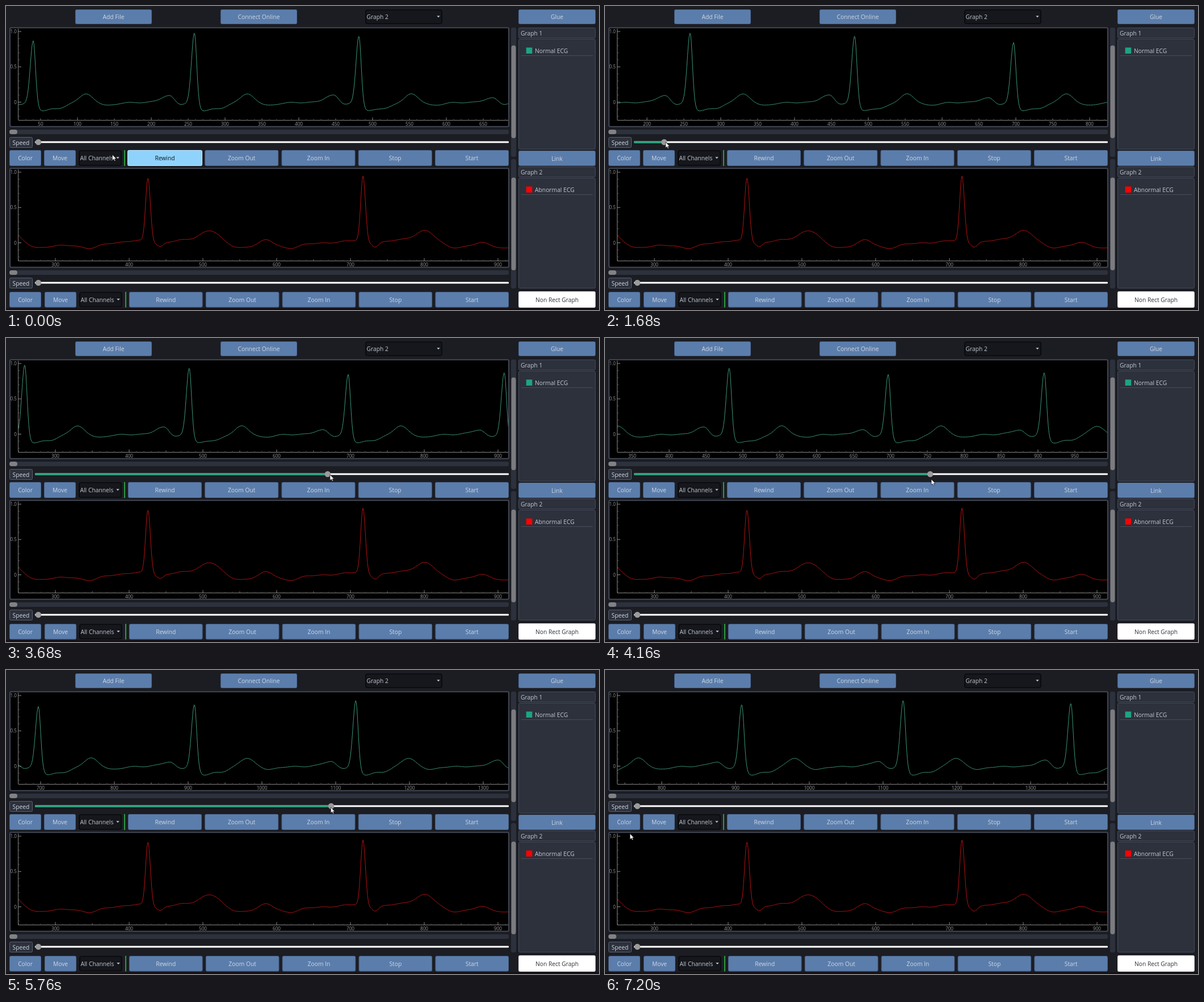
An HTML page for the animation above (7280 ms loop, 1045 by 536 pixels).

```html
<!DOCTYPE html>
<html lang="en">
<head>
<meta charset="utf-8">
<title>ECG viewer</title>
<style>
  html, body { margin: 0; width: 100%; height: 100%; overflow: hidden; background: #1b1d23; }
  svg { display: block; width: 1045px; height: 536px; font: 10.3px "Open Sans", "Noto Sans", sans-serif; fill: #c3c8d1; }
  .tick { font-size: 8.2px; fill: #999; }
</style>
</head>
<body>
<svg id="stage" viewBox="0 0 1045 536" xmlns="http://www.w3.org/2000/svg"></svg>
<script>
const LOOP = 7280;
const LEFT = 22, RIGHT = 886, UNIT = 1.3, SPAN = 665, VOLT = 124.5;
const PANEL = '#2c313c', EDGE = '#464c5a', BLUE = '#5b7dab', GREEN = '#1fa67c';

// ---- drawing helpers ----
const rect = (x, y, w, h, fill, extra = '') =>
  `<rect x="${x}" y="${y}" width="${w}" height="${h}" fill="${fill}" ${extra}/>`;
const box = (x1, y1, x2, y2, fill, edge) =>
  rect(x1 + .5, y1 + .5, x2 - x1 - 1, y2 - y1 - 1, fill, `stroke="${edge}" rx="2"`);
const text = (x, y, s, extra = '') => `<text x="${x}" y="${y + 3.8}" ${extra}>${s}</text>`;
const MID = 'text-anchor="middle"';
const line = (x1, y1, x2, y2, color, w = 1) =>
  `<line x1="${x1}" y1="${y1}" x2="${x2}" y2="${y2}" stroke="${color}" stroke-width="${w}"/>`;

const button = (x1, y1, x2, y2, label, fill = BLUE, edge = '#4b638a', ink = '#d0d7e2') =>
  box(x1, y1, x2, y2, fill, edge) + text((x1 + x2) / 2, (y1 + y2) / 2 + .5, label, `${MID} fill="${ink}"`);

const combo = (x1, y1, x2, y2, label) => {
  const y = (y1 + y2) / 2, a = x2 - 7;
  return rect(x1 + 1, y1 + 1, x2 - x1 - 2, y2 - y1 - 2, '#15171c', 'stroke="#08090c" stroke-width="1.6" rx="3"')
    + text(x1 + 2.5, y + .5, label)
    + `<path d="M${a - 2.7} ${y - 1.7}h5.4l-2.7 3z"/>`;
};

const slider = (y, handle, active) =>
  rect(51, y - 1.5, RIGHT - 51, 3, '#fff', 'rx="1"')
  + (active ? rect(51, y - 1.5, handle - 51, 3, GREEN, 'rx="1"') : '')
  + `<circle cx="${handle}" cy="${y}" r="5.2" fill="#9b9b9b"/>`;

// ---- signals: each beat is a sum of skewed bells, heights in pixels ----
const bump = (d, height, rise, fall) => height * Math.exp(-((d / (d < 0 ? rise : fall)) ** 2) / 2);

const normalBeat = (d, spike, early) =>
  bump(d + 34, early, 12, 6) + bump(d + 19, -3, 5, 8)
  + bump(d, spike, 3.9, 3)
  + bump(d - 12, -13, 5, 10) + bump(d - 36, -9, 12, 10)
  + bump(d - 71, 15, 9, 9) + bump(d - 102, -5, 9, 10);

const abnormalBeat = (d, spike, late) =>
  bump(d + 12, 5, 16, 8)
  + bump(d, spike, 3.1, 3.3) + bump(d - 17, -7, 4, 4)
  + bump(d - 50, 6, 16, 20) + bump(d - 85, 21, 13, 12.5)
  + bump(d - 125, -8, 13, 18) + bump(d - 161, late, 9, 8) + bump(d - 192, -9, 14, 12);

// Beats are [time, spike height, height of the small wave].
const NORMAL = [[40, 110, 0], [258.5, 124, 12], [481.5, 119, 13], [697, 107, 8],
  [908.5, 110, 8], [1127.3, 117, 9], [1354.6, 113, 11]];
const ABNORMAL = [[153, 0, -2], [425.5, 114, 8], [717, 116, 3]];

function trace(shape, beats, from, to) {
  const out = [];
  for (let x = from; x <= to; x++) {
    const y = beats.reduce((sum, [at, ...size]) => sum + shape(x - at, ...size), .6 * Math.sin(x * .23) - .8);
    out.push(`${(x * UNIT).toFixed(1)},${(-y).toFixed(1)}`);
  }
  return out.join(' ');
}

// ---- axes ----
const TICKS = ['#8c8c8c', '#707070', '#444'];

function timeAxis(start, y) {
  const halves = [];
  for (let v = Math.ceil(start / 50) * 50; v <= start + SPAN; v += 50) halves.push(v);
  const step = halves.join('').length <= 40 ? 50 : 100;
  let out = '';
  for (let v = Math.ceil(start / 10) * 10; v <= start + SPAN; v += 10) {
    const x = LEFT + (v - start) * UNIT;
    const level = v % 100 === 0 ? 0 : v % 50 === 0 ? 1 : 2;
    out += line(x, y, x, y - 5 / (1 + level / 2), TICKS[level]);
    if (v % step === 0 && x < RIGHT - 10) out += text(x, y + 5.2, v, `class="tick" ${MID}`);
  }
  return out;
}

function voltAxis(zero) {
  let out = '';
  for (let i = -2; i <= 10; i++) {
    const y = zero - i * VOLT / 10, major = i % 5 === 0;
    out += line(LEFT, y, LEFT + (major ? 5 : 2.5), y, TICKS[major ? 0 : 2]);
    if (major) out += text(19, y - .6, i ? (i / 10).toFixed(1) : '0', 'class="tick" text-anchor="end"');
  }
  return out;
}

// ---- layout ----
function plot(id, top, points, color) {
  const zero = top + 131.5, axis = top + 163.5;
  return rect(7, top + .3, 879, 174.3, '#000', `stroke="${EDGE}" stroke-width="1.8" rx="2"`)
    + line(LEFT - .5, top + 2, LEFT - .5, axis, '#858585') + line(LEFT, axis, RIGHT - 1, axis, '#858585')
    + voltAxis(zero)
    + `<g id="${id}Axis"></g>`
    + `<clipPath id="${id}Clip">${rect(LEFT, top + 2, RIGHT - LEFT - 1, 162)}</clipPath>`
    + `<g clip-path="url(#${id}Clip)"><polyline id="${id}Trace" points="${points}"
        fill="none" stroke="${color}" stroke-linejoin="round"/></g>`
    + rect(6, top + 180, 880, 8, PANEL, 'rx="3"') + rect(6, top + 180, 14, 8, '#818286', 'rx="4"')
    + button(6, top + 193, 47, top + 212, 'Speed', PANEL, '#596072');
}

// Controls under a plot; the wide buttons share the room right of the bar.
function controls(y1, y2, shift) {
  const first = 215 + 2 * shift, gap = 5.3, w = (RIGHT - first - 4 * gap) / 5;
  return button(6, y1, 62, y2, 'Color') + button(67 + shift, y1, 123 + shift, y2, 'Move')
    + combo(128 + shift, y1, 204 + shift, y2, 'All Channels')
    + line(209 + 2 * shift, y1, 209 + 2 * shift, y2, '#2c9c3c', 2)
    + ['Rewind', 'Zoom Out', 'Zoom In', 'Stop', 'Start'].map((label, i) => {
      const x = first + i * (w + gap);
      return button(x, y1, x + w, y2, label);
    }).join('');
}

function legend(top, bottom, title, name, color) {
  return box(903, top, 1039, top + 19, PANEL, EDGE) + text(907, top + 10, title)
    + box(903, top + 20, 1039, bottom, PANEL, EDGE)
    + rect(916.7, top + 35.3, 10.6, 10.6, color) + text(932, top + 41, name)
    + line(908, top + 49.5, 1034, top + 49.5, '#474d5a');
}

const scrollbar = (y, handle) =>
  rect(890, y, 9, 228, PANEL, 'rx="3"') + rect(890.5, handle, 8, 163.5, '#7b7c80', 'rx="4"');

document.getElementById('stage').innerHTML =
  rect(0, 0, 1045, 536, '#1b1d23') + rect(0, 533, 1045, 3, '#160f14')
  + button(122, 6, 257, 32, 'Add File') + button(378, 6, 513, 32, 'Connect Online')
  + combo(633, 6, 769, 32, 'Graph 2')
  + button(903, 6, 1039, 32, 'Glue')
  + plot('top', 38, trace(normalBeat, NORMAL, 20, 1420), '#3b957b')
  + controls(254, 282, 0)
  + `<g id="hover">${button(214, 254, 346, 282, 'Rewind', '#8fd3fc', '#c4e8ff', '#10141a')}</g>`
  + plot('low', 286, trace(abnormalBeat, ABNORMAL, 250, 916), '#b41212')
  + slider(488, 57, false)
  + controls(504, 531.5, 1)
  + scrollbar(38, 69.5) + scrollbar(270, 302.5)
  + legend(38, 253, 'Graph 1', 'Normal ECG', '#1fa384')
  + button(903, 255, 1039, 282, 'Link')
  + legend(283, 498, 'Graph 2', 'Abnormal ECG', '#f00')
  + button(903, 503, 1039, 532, 'Non Rect Graph', '#fff', '#d5d7dc', '#2c3038')
  + '<g id="speed"></g>'
  + '<path id="cursor" d="M0 0V10.2L2.4 8L4 11.4L5.6 10.7L4.1 7.4H7.2Z" fill="#fff" stroke="#111" stroke-width=".7"/>';

const el = id => document.getElementById(id);
const place = (id, x, y) => el(id).setAttribute('transform', `translate(${x} ${y})`);
el('lowAxis').innerHTML = timeAxis(250, 449.5);
place('lowTrace', LEFT - 250 * UNIT, 417.5);

// ---- motion ----
// Linear track through [time, ...values] keys.
function at(keys, t) {
  let i = 0;
  while (i < keys.length - 2 && keys[i + 1][0] <= t) i++;
  const [t0, ...a] = keys[i], [t1, ...b] = keys[i + 1];
  const u = Math.max(0, Math.min(1, (t - t0) / (t1 - t0)));
  return a.map((v, k) => v + (b[k] - v) * u);
}

// Scrolling nearly stalls while the speed handle is dragged.
const SCROLL = [[0, 20], [1500, 152], [3800, 260], [5800, 682], [6600, 692], [LOOP, 749]];
const HANDLE = [[0, 57], [1400, 57], [2880, 306], [3700, 573], [5780, 573], [6500, 57]];
const CURSOR = [[0, 187.5, 262], [800, 51, 240], [1400, 58, 240], [2880, 315, 240], [3700, 577, 241],
  [4100, 575, 249], [5400, 575, 249], [5760, 573, 242], [6500, 51, 241], [7200, 44, 288.5]];

let shown = -1;

function draw(t) {
  const start = Math.floor(at(SCROLL, t)[0] / 10) * 10;
  if (start !== shown) {
    shown = start;
    el('topAxis').innerHTML = timeAxis(start, 201.5);
    place('topTrace', LEFT - start * UNIT, 169.5);
  }
  const [handle] = at(HANDLE, t);
  el('speed').innerHTML = slider(240, handle, handle > 57);
  el('hover').style.display = t < 80 ? '' : 'none';
  place('cursor', ...at(CURSOR, t));
}

const began = performance.now();
function tick() {
  draw((performance.now() - began) % LOOP);
  requestAnimationFrame(tick);
}
tick();
</script>
</body>
</html>
```
